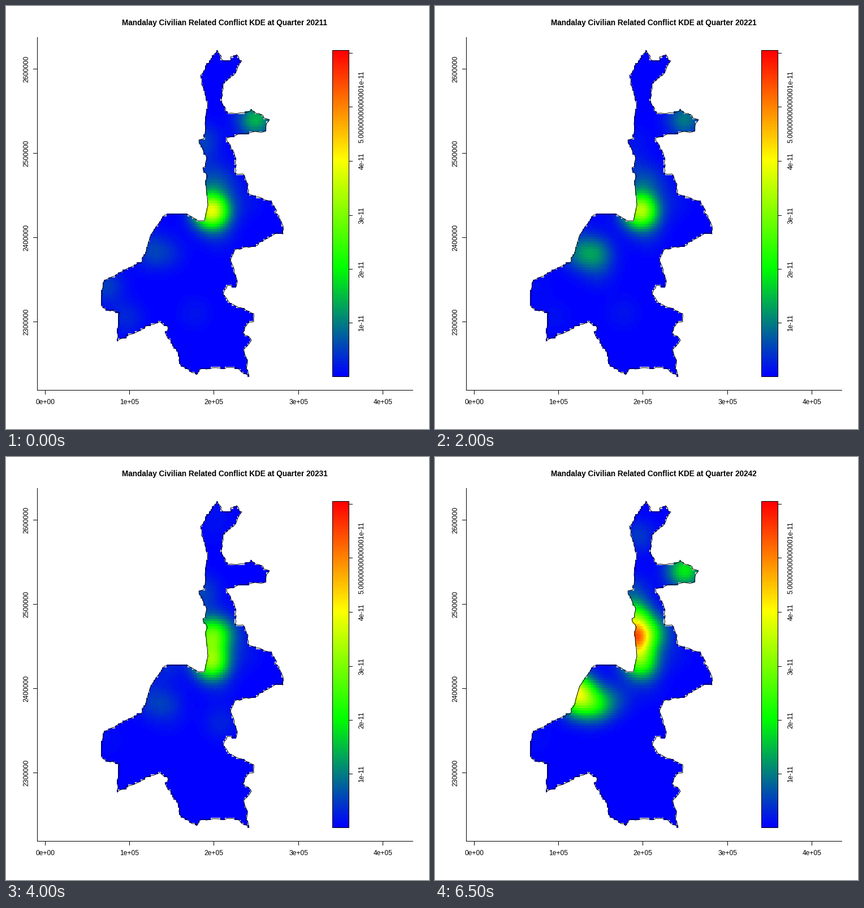
A matplotlib script that plays this animation: 748x748 px, repeating every 7 s.

```python
import numpy as np
import matplotlib.pyplot as plt
from matplotlib.animation import FuncAnimation
from matplotlib.colors import LinearSegmentedColormap
from matplotlib.patches import Rectangle
from matplotlib.path import Path

SIZE = 748
FRAMES = 14
PX = 0.72                      # points per pixel at 100 dpi
LEFT, RIGHT, TOP, BOTTOM = 168.5, 490.5, 78, 656
CELLS = 128
SIGMA = 21.5                   # kernel width in pixels
VMAX = 6.05                    # units of 1e-11
UNIT = 95.5                    # colour bar pixels per 1e-11

plt.rcParams["font.family"] = "Liberation Sans"

# Corners of the region, clockwise from the northern tip, in stage pixels
NORTH = [(374, 79), (384, 97), (398, 97), (397, 90), (408, 86), (417, 97),
         (403, 122), (384, 137), (381, 168), (388, 185), (394, 190),
         (425, 188), (434, 184), (466, 201), (457, 222), (413, 226),
         (390, 233), (405, 266), (405, 296)]
EAST = [(419, 297), (428, 315), (428, 332), (470, 347), (490, 390), (490, 403),
        (478, 401), (440, 424), (404, 432), (397, 449), (409, 486), (407, 496),
        (391, 494), (384, 510), (396, 526), (438, 544), (438, 558), (428, 559),
        (419, 578), (434, 591), (421, 606), (430, 655)]
SOUTH = [(405, 640), (376, 640), (345, 641), (337, 652), (309, 635),
         (304, 612), (284, 583), (287, 569), (272, 558), (230, 577),
         (197, 592), (201, 542), (174, 535), (169, 528), (172, 489),
         (200, 472), (241, 451)]
RIVER = [(248, 432), (256, 405), (280, 370), (292, 368), (320, 368),
         (340, 380), (351, 380), (357, 352), (353, 310)]
WEST = [(356, 301), (349, 291), (355, 269), (341, 237), (351, 234),
        (356, 170), (344, 123), (365, 91)]


def roughen(points, amount, rng, step=5):
    """Split a polyline into short steps and shake the inner ones."""
    out = []
    for a, b in zip(points[:-1], points[1:]):
        a, b = np.array(a, float), np.array(b, float)
        n = max(1, round(np.hypot(*(b - a)) / step))
        for i in range(n):
            shake = rng.normal(0, amount, 2) if i else 0
            out.append(a + (b - a) * i / n + shake)
    return out


def build_border():
    rng = np.random.default_rng(4)
    border = np.array(roughen(NORTH + EAST + SOUTH + RIVER[:1], 1, rng)
                      + roughen(RIVER + WEST[:1], 0.2, rng)
                      + roughen(WEST + NORTH[:1], 0.8, rng)
                      + NORTH[:1])
    border[:, 0] = border[:, 0].clip(LEFT, RIGHT)
    return border


border = build_border()
xs = LEFT + (np.arange(CELLS) + 0.5) * (RIGHT - LEFT) / CELLS
ys = TOP + (np.arange(CELLS) + 0.5) * (BOTTOM - TOP) / CELLS
gx, gy = np.meshgrid(xs, ys)
inside = Path(border).contains_points(np.c_[gx.ravel(), gy.ravel()])
inside = inside.reshape(gx.shape)


def bump(k, mid, width=1.0):
    return np.exp(-0.5 * ((k - mid) / width) ** 2)


def rise(k, mid):
    return 1 / (1 + np.exp(-2 * (k - mid)))


def hot_spots(k):
    """Centre and strength of each cluster in quarter k."""
    late = rise(k, 11.5)
    # the city and its northern suburbs
    yield 364, 362, 3.85 - 0.11 * k
    yield 362, 316, 0.4 + 2 * bump(k, 8.3, 1.1)
    yield 353, 320, 4.2 * late
    yield 352, 283, 0.2 + 2 * late
    yield 388, 310, 0.2 + 0.6 * bump(k, 2) + 0.85 * rise(k, 8)
    yield 378, 405, 0.15 + 0.5 * bump(k, 2)
    yield 424, 348, 0.15
    # the eastern arm and the far north
    yield 442, 201, 1.45 - 1.42 * bump(k, 8, 2.7) + 0.75 * late
    yield 348, 238, 0.15 + 0.35 * (bump(k, 0) + bump(k, 8) + late)
    yield 360, 140, 0.45 * rise(k, 9)
    yield 372, 105, 0.2 * bump(k, 9)
    # the river bank
    yield 255, 438, 0.25 + 1.5 * bump(k, 2.4) + 0.8 * late
    yield 250, 413, 0.15 + 3.1 * late
    yield 286, 437, 0.3 + 0.6 * bump(k, 4) + 0.3 * bump(k, 10) + 1.3 * late
    yield 322, 428, 0.4 * late
    yield 284, 368, 1.1 * bump(k, 6, 0.8) + 1.9 * bump(k, 10)
    yield 290, 470, 0.25 * bump(k, 4) + 0.5 * bump(k, 10)
    # faint traces on the plain
    yield 178, 495, 0.1 + 0.4 * bump(k, 0)
    yield 213, 551, 0.33 * np.exp(-k / 4)
    yield 334, 543, 0.22 * bump(k, 2, 2.5)
    yield 380, 470, 0.28 * bump(k, 8)
    yield 447, 545, 0.5 * bump(k, 10)


def density(k):
    total = sum(w * np.exp(-((gx - x) ** 2 + (gy - y) ** 2) / (2 * SIGMA ** 2))
                for x, y, w in hot_spots(k))
    return np.ma.masked_where(~inside, total)


def title_text(k):
    return ("Mandalay Civilian Related Conflict KDE at Quarter "
            f"{2021 + k // 4}{k % 4 + 1}")


fig = plt.figure(figsize=(SIZE / 100, SIZE / 100), dpi=100, facecolor="white")
ax = fig.add_axes([0, 0, 1, 1])
ax.axis("off")

ramp = LinearSegmentedColormap.from_list(
    "heat", ["#0000ff", "#00ff00", "#ffff00", "#ff0000"], N=CELLS)
ramp.set_bad(alpha=0)


def line(x, y):
    ax.plot(x, y, color="black", lw=PX, snap=False,
            solid_capstyle="butt", solid_joinstyle="miter")


def label(x, y, text, angle=0, px=12, **kw):
    return ax.text(x, y, text, fontsize=px * PX, rotation=angle, ha="center",
                   va="baseline", rotation_mode="anchor", color="black", **kw)


def raster(data, extent):
    return ax.imshow(data, cmap=ramp, vmin=0, vmax=VMAX, extent=extent,
                     interpolation="nearest", aspect="auto")


heat = raster(density(0), (LEFT, RIGHT, BOTTOM, TOP))
line(border[:, 0], border[:, 1])

# Axes
line([55.5, 55.5], [55, 680])
line([55, 720], [679.5, 679.5])
for i in range(5):
    x = round(69 + 149.2 * i) + 0.5
    line([x, x], [679, 687])
    label(x, 704.5, f"{i}e+05" if i else "0e+00")
for i in range(4):
    y = 111.5 + 149 * i
    line([48, 56], [y, y])
    label(39.5, y, str(2600000 - 100000 * i), 90)

# Colour bar
raster(np.linspace(VMAX, 0, CELLS)[:, None], (577, 606, BOTTOM, TOP))
ax.add_patch(Rectangle((577.5, 78.5), 29, 577, fill=False, ec="black",
                       lw=PX, snap=False))
for i in range(1, 7):
    y = round(BOTTOM - UNIT * i) + 0.5
    line([606, 613], [y, y])
    if i < 6:
        name = "5.00000000000001e-11" if i == 5 else f"{i}e-11"
        label(632.5, y, name, 90)

title = label(387, 34, title_text(0), px=13.6, weight="bold")
ax.set_xlim(0, SIZE)
ax.set_ylim(SIZE, 0)


def update(k):
    heat.set_data(density(k))
    title.set_text(title_text(k))
    return heat, title


anim = FuncAnimation(fig, update, frames=FRAMES, interval=500, repeat=True,
                     repeat_delay=0, blit=False)
plt.show()
```
